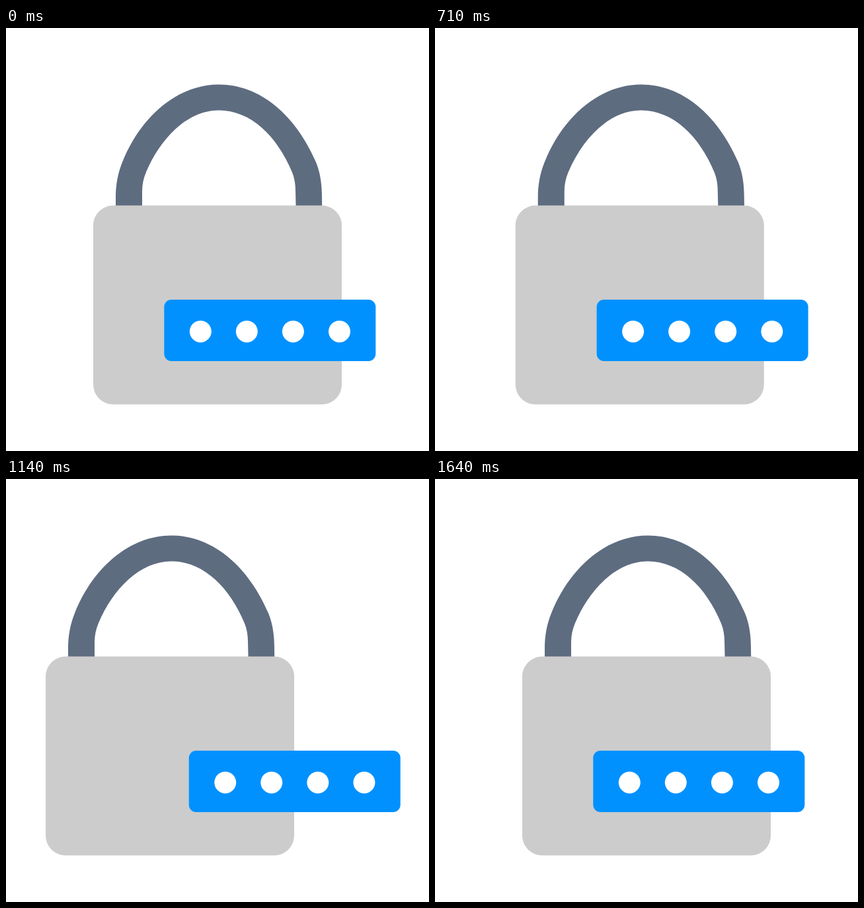
An HTML page that plays this animation: 640x640 px, repeating every 2000 ms.

```html
<!DOCTYPE html>
<html lang="en">
<head>
<meta charset="utf-8">
<title>Password lock</title>
<style>
  html, body { margin: 0; width: 100%; height: 100%; overflow: hidden; background: #fff; }
  svg { display: block; width: 100vw; height: 100vh; }
  #shackle { fill: #5e6c80; }
  #body { fill: #ccc; }
  #field { fill: #0091ff; }
  #field circle { fill: #fff; }
</style>
</head>
<body>
<svg viewBox="0 0 640 640">
  <g id="lock">
    <path id="shackle" d="M166 256C166 238 169 220 176 203C204 133 260 85.5 322 85.5C384 85.5 438 131 469 203C476 220 478 238 478 256L478.5 288.5H439L438 246C438 237 436.5 227 433 218.5C410 163 370 124.5 322 124.5C275 124.5 234 166 212 218C208 227 206 237 206 247V350H166Z"/>
    <rect id="body" x="132" y="268.6" width="376" height="301" rx="30"/>
  </g>
  <g id="field">
    <rect x="239.3" y="411" width="320" height="93" rx="11"/>
    <circle cx="294.3" cy="459.2" r="16.5"/>
    <circle cx="364.3" cy="459.2" r="16.5"/>
    <circle cx="434.4" cy="459.2" r="16.5"/>
    <circle cx="504.5" cy="459.2" r="16.5"/>
  </g>
</svg>
<script>
  const LOOP = 2000, STEP = LOOP / 28; // 14 poses per second
  const $ = id => document.getElementById(id);
  const [lock, shackle, body, field] = ['lock', 'shackle', 'body', 'field'].map($);

  const linear = u => u;
  const sine = u => (1 - Math.cos(Math.PI * u)) / 2;
  const easeOut = u => 1 - (1 - u) ** 2;

  // Keys are [time, value, easing into this key].
  const OPEN = [[0, 0], [200, 1, linear], [400, 1, linear], [550, 0, linear]];
  const SLIDE = [
    [655, 0], [1000, 59.7, linear], [1140, 72, easeOut], [1214, 72, linear],
    [1322, 24, sine], [1440, 54, sine], [1640, 0, sine]
  ];

  function valueAt(keys, t) {
    const i = keys.findIndex(k => k[0] > t);
    if (i === 0) return keys[0][1];
    if (i < 0) return keys[keys.length - 1][1];
    const [t0, v0] = keys[i - 1], [t1, v1, ease] = keys[i];
    return v0 + (v1 - v0) * ease((t - t0) / (t1 - t0));
  }

  function move(el, x, y) {
    el.setAttribute('transform', `translate(${x.toFixed(2)} ${y.toFixed(2)})`);
  }

  function draw(now) {
    const t = Math.floor(((now + 5) % LOOP) / STEP) * STEP;
    const open = valueAt(OPEN, t), slide = valueAt(SLIDE, t);
    move(shackle, 0, -53 * open);
    move(body, 0, 11.4 * open);
    move(lock, -slide, 0);
    move(field, 0.52 * slide, 0);
    requestAnimationFrame(draw);
  }
  draw(performance.now());
</script>
</body>
</html>
```
